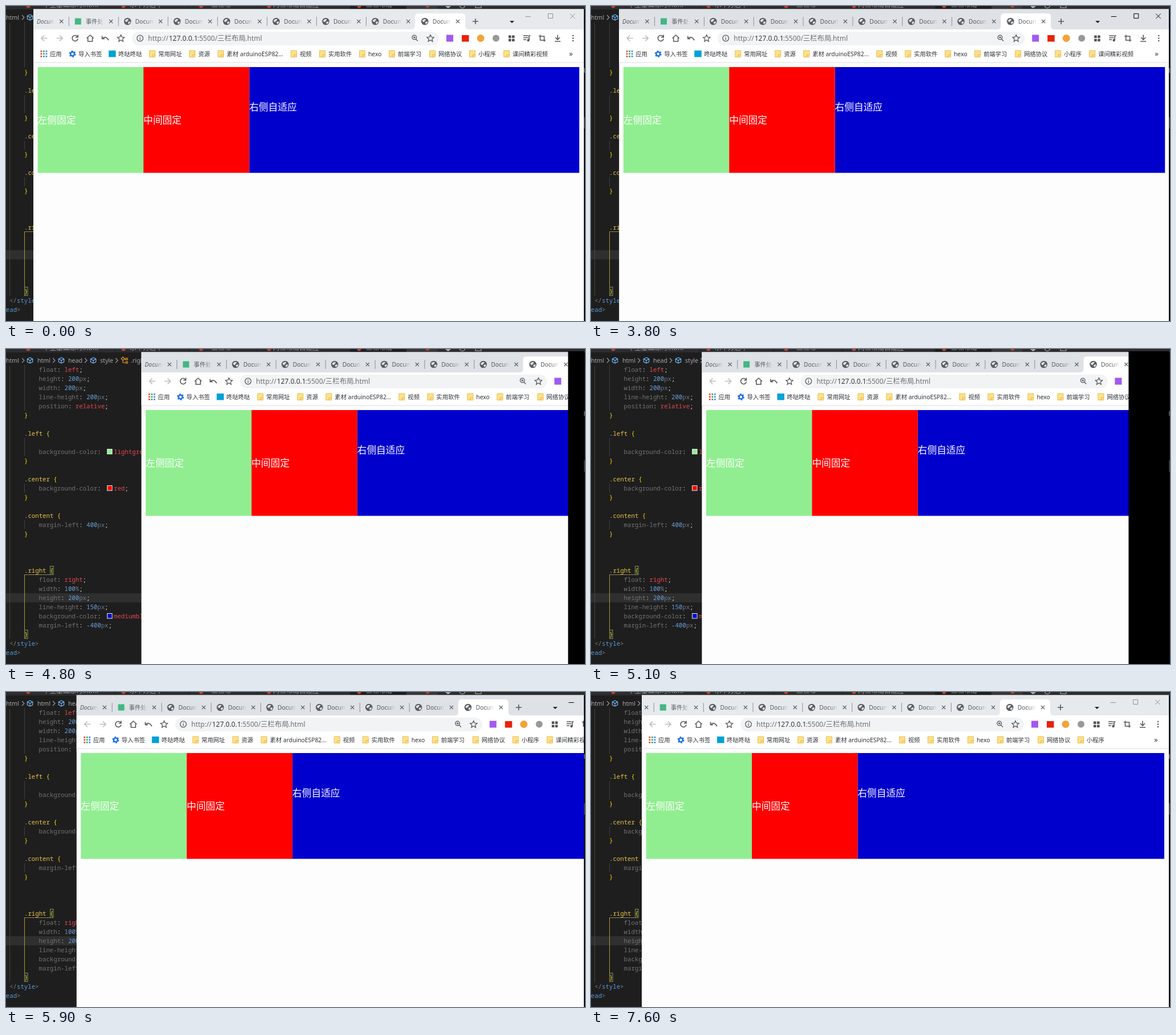
These frames come from a looping animation (1015 px wide and 552 px high, 7700 ms). An HTML page:

```html
<!DOCTYPE html>
<html lang="zh">
<head>
<meta charset="utf-8">
<title>三栏布局</title>
<style>
html, body { margin: 0; width: 100%; height: 100%; overflow: hidden; background: #1e1e1e; }
svg { display: block; }
text { font-family: "Noto Sans", "Noto Sans CJK SC", sans-serif; }
.code { font-family: "Noto Sans Mono", "DejaVu Sans Mono", monospace; font-size: 10.7px; }
.cjk { font-family: "Noto Sans CJK SC", sans-serif; }
.icon { fill: none; stroke: #55595e; stroke-width: 1.6; }
</style>
</head>
<body>
<svg id="stage" width="1015" height="552" viewBox="0 0 1015 552"></svg>
<script>
const LOOP = 7700, LEFT = 48, RIGHT = 1013, PEAK = 265;

const rect = (x, y, w, h, fill, more = '') =>
  `<rect x="${x}" y="${y}" width="${w}" height="${h}" fill="${fill}" ${more}/>`;
const circle = (x, y, r, fill, more = '') =>
  `<circle cx="${x}" cy="${y}" r="${r}" fill="${fill}" ${more}/>`;
const path = (d, more = '') => `<path d="${d}" ${more}/>`;
const text = (x, y, s, size, fill, more = '') =>
  `<text x="${x}" y="${y}" font-size="${size}" fill="${fill}" ${more}>${s}</text>`;
const at = (x, y, body, more = '') => `<g transform="translate(${x} ${y})" ${more}>${body}</g>`;
const icon = (x, y, d, more = '') => at(x, y, path(d, `class="icon" ${more}`));
const span = (s, fill) => `<tspan fill="${fill}">${s}</tspan>`;

// ---- code editor ----
const GOLD = '#e8c34a';

function codeLine(x, y, body) {
  return `<text class="code" x="${x}" y="${y + 3.8}">${body}</text>`;
}

function selector(y, name) {
  return codeLine(32, y, span(name, GOLD) + ' ' + span('{', '#ffd700'));
}

function declaration(y, prop, value, swatch) {
  const head = span(prop, '#727272') + span(':', '#d4d4d4');
  const end = span(';', '#d4d4d4');
  const number = value.match(/^(-?\d+)(.*)$/);
  const body = number ? span(number[1], '#6a9fd8') + span(number[2], '#68788a') : span(value, '#e5484d');
  if (!swatch) return codeLine(57.6, y, head + ' ' + body + end);
  return codeLine(57.6, y, head) +
    rect(177.5, y - 4.5, 8.5, 8.5, swatch, 'stroke="#eee" stroke-width="1"') +
    codeLine(189, y, body + end);
}

function breadcrumb() {
  const cube = x => icon(x, 20, 'M0 -5L4.7 -2.6V2.6L0 5L-4.7 2.6V-2.6ZM-4.7 -2.6L0 0L4.7 -2.6M0 0V5',
    'style="stroke:#75beff;stroke-width:1.1"');
  const word = (x, s) => text(x, 23.8, s, 10.6, '#a9a9a9');
  const arrow = x => icon(x, 20, 'M-2 -4L2 0L-2 4', 'style="stroke:#a0a0a0;stroke-width:1.1"');
  return word(0, 'html') + word(55, 'html') + word(109, 'head') + word(165, 'style') + word(219, '.right') +
    [30, 84, 140, 194].map(arrow).join('') + [42, 97, 153].map(cube).join('') +
    icon(207, 20, 'M-5 -3L-2 -6L1 -3L-2 0ZM-2 0V4H2M0 -2H3M3 -4H6V-1H3ZM3 2H6V5H3Z',
      'style="stroke:#ee9d28;stroke-width:1.2"');
}

function editorTabs() {
  const names = [[39, 65, '中型基础练习.html'], [206, 217, '水平方居中'], [342, 360, '三栏布'],
    [461, 468, '两栏布局自适应'], [619, 631, '三栏布局']];
  return rect(0, 0, 1015, 6, '#2d2d2d') + rect(604, 0, 98, 6, '#1e1e1e') + rect(702, 0, 54, 6, '#383838') +
    [190, 320, 440, 603].map(x => rect(x, 0, 1, 6, '#202020')).join('') +
    names.map(([dot, x, s]) => circle(dot, 0, 3.4, '#c8412b') + text(x, 1.5, s, 11.5, '#a0a0a0')).join('') +
    circle(739, 0, 3, '#c8412b') +
    icon(775, 0, 'M-4 0L0 3L4 0M0 3V-3', 'style="stroke:#bbb"') +
    circle(800, -1, 4.5, 'none', 'stroke="#bbb" stroke-width="1.2"') +
    rect(823, -5, 10, 8, 'none', 'stroke="#bbb"');
}

function editor() {
  const braces = [116, 196, 260, 324, 500].map(y => codeLine(32, y, span('}', '#ffd700'))).join('');
  const guides = [[28, 80], [156, 32], [236, 16], [300, 16]]
    .map(([y, h]) => rect(32, y, 1, h, '#404040')).join('');
  const box = (x, y) => rect(x, y, 5.5, 15, '#1d2a1d', 'stroke="#8a8a6a" stroke-width="1"');
  return rect(0, 0, 1015, 552, '#1e1e1e') + editorTabs() + breadcrumb() +
    rect(0, 428, 1013, 16, '#2f2f30') +
    rect(6, 30, 1, 478, '#45453c') + guides +
    rect(32, 396, 1, 96, '#b3942c') + rect(32, 395, 51, 1, '#8f8650') +
    box(77.5, 380.5) + box(32.5, 492.5) +
    declaration(36, 'float', 'left') + declaration(52, 'height', '200px') +
    declaration(68, 'width', '200px') + declaration(84, 'line-height', '200px') +
    declaration(100, 'position', 'relative') +
    selector(148, '.left') + declaration(180, 'background-color', 'lightgreen', '#90ee90') +
    selector(228, '.center') + declaration(244, 'background-color', 'red', '#f00') +
    selector(292, '.content') + declaration(308, 'margin-left', '400px') +
    selector(388, '.right') + declaration(404, 'float', 'right') + declaration(420, 'width', '100%') +
    declaration(436, 'height', '200px') + declaration(452, 'line-height', '150px') +
    declaration(468, 'background-color', 'mediumblue', '#0000cd') + declaration(484, 'margin-left', '-400px') +
    braces +
    codeLine(6.2, 516, span('&lt;/', '#808080') + span('style', '#569cd6') + span('&gt;', '#808080')) +
    codeLine(-19.4, 532, span('&lt;/', '#808080') + span('head', '#569cd6') + span('&gt;', '#808080')) +
    rect(RIGHT, 6, 2, 546, '#0c0c0c') + rect(RIGHT, 109, 2, 8, '#555') + rect(RIGHT, 195, 2, 20, '#3a3a3a');
}

// ---- browser ----
const cross = (x, y, r, more) => icon(x, y, `M${-r} ${-r}L${r} ${r}M${r} ${-r}L${-r} ${r}`, more);
const STAR = 'M0 -6L1.8 -2L6.1 -1.6L2.9 1.3L3.8 5.6L0 3.3L-3.8 5.6L-2.9 1.3L-6.1 -1.6L-1.8 -2Z';

const globe = circle(0, 0, 6.3, '#5a5e63') +
  path('M-4.5 -1.5Q-2 -5 1.5 -4Q2 -1.5 -0.5 -1Q0 1 -2 1Q-4 1 -4.5 -1.5ZM0.5 1.5Q3 -0.5 5 0.5Q4.5 4 1.5 4.8Q1.5 3 0.5 1.5Z',
    'fill="#e4e6e9"');

function tab(i) {
  const x = 39.4 + i * 86.85;
  const title = i === 1 ? '事件处理' : 'Document';
  const slant = i === 0 ? 'font-style="italic"' : '';
  const mark = i === 1 ? rect(-5.5, -5.5, 11, 11, '#41b883') : i ? globe : '';
  return at(x, 27, mark + text(i ? 13.5 : 14.5, 4, title, 10.3, 'url(#fade)', slant) +
    cross(57.8, 0, 3.1, 'style="stroke-width:1.3"') +
    (i < 7 ? rect(70.4, -8, 1, 16, '#8b8f95') : ''));
}

function tabs() {
  const all = Array.from({ length: 9 }, (_, i) => tab(i)).join('');
  return path('M711 41Q717 41 717 35V19Q717 13 723 13H799Q805 13 805 19V35Q805 41 811 41Z', 'fill="#fff"') + all +
    icon(823, 27, 'M-5 0H5M0 -5V5') + path('M883 26H891L887 30Z', 'fill="#222"') +
    `<g id="controls" fill="none" stroke-width="1">` +
    path('M910.5 18.5H920M950.5 13.5H958.5V21.5H950.5ZM989 13.5L997.5 22M997.5 13.5L989 22') + '</g>';
}

function toolbarLeft() {
  const dim = 'style="stroke:#b9bcc0"';
  return icon(67, 56.5, 'M5.5 0H-5M0 -5L-5 0L0 5', dim) + icon(94, 56.5, 'M-5.5 0H5M0 -5L5 0L0 5', dim) +
    icon(121, 56.5, 'M4.3 -2.8A5 5 0 1 0 5 1M5 -6V-1.8H.8') +
    icon(147.5, 56.5, 'M-6 0L0 -5.5L6 0M-4 -1V5.5H4V-1') +
    icon(174, 56.5, 'M-5.5 -4V1H-1M-5 .5Q1 -5 6 3.5') +
    icon(201.5, 56.5, STAR, 'style="stroke-width:1.3"') +
    icon(235, 56.5, 'M-5.3 0A5.3 5.3 0 1 0 5.3 0A5.3 5.3 0 1 0 -5.3 0M0 -.8V3M0 -3V-1.8', 'style="stroke-width:1.3"') +
    text(249, 60.6, 'http://', 12, '#6b6f74') + text(285.5, 60.6, '127.0.0.1', 12, '#35383c') +
    text(335.5, 60.6, ':5500/', 12, '#6b6f74') +
    text(370.5, 60.8, '三栏布局', 12.4, '#6b6f74', 'class="cjk"') + text(419.5, 60.6, '.html', 12, '#6b6f74');
}

function toolbarRight() {
  return icon(716.5, 56, 'M-4.5 -1A3.8 3.8 0 1 0 3.1 -1A3.8 3.8 0 1 0 -4.5 -1M2 2L5.5 5.5M-2.5 -1H1.2M-.7 -2.8V.8',
      'style="stroke-width:1.3"') +
    icon(744, 56.5, STAR, 'style="stroke-width:1.3"') +
    rect(772, 50.5, 12, 12, '#a259f0') +
    rect(799, 51, 12.5, 11.5, '#e8220c') +
    circle(832, 56.5, 6.5, '#f2a33a') +
    circle(859, 56.5, 6, '#999') +
    [[881, 51.5], [887, 51.5], [881, 57.5], [887, 57.5]].map(([x, y]) => rect(x, y, 4.5, 4.5, '#4d5156')).join('') +
    icon(913, 56.5, 'M-6 -4.5H2.5M-6 -1H2.5M-6 2.5H-1M4 3.5V-4.5H6.5') + circle(915.5, 60, 2.2, '#55595e') +
    icon(940, 56.5, 'M-6 -3.5H3.5V6M-3.5 -6V3.5H6') +
    icon(967, 56.5, 'M0 -6V2M-4 -1.5L0 2.5L4 -1.5M-5 5.5H5') +
    [52, 56.5, 61].map(y => circle(994, y, 1.3, '#55595e')).join('') +
    text(987, 87.5, '»', 13, '#333');
}

function bookmarks() {
  const label = (x, s) => text(x, 87.6, s, 10.3, '#2f3236');
  const folder = x => path(`M${x - 4.5} 78H${x + 5.5}V89.5H${x - 4.5}Z`, 'fill="#ffe08a" stroke="#e8c052"') +
    path(`M${x + 1} 89.5V85.5H${x + 5.5}`, 'fill="none" stroke="#e0b64a"');
  const items = [[267, '常用网址'], [337, '资源'], [387, '素材 arduinoESP82...'], [515, '视频'], [565, '实用软件'],
    [635, 'hexo'], [687, '前端学习'], [758, '网络协议'], [828, '小程序']];
  const hues = ['#ea4335', '#34a853', '#4285f4', '#fbbc05'];
  let dots = '';
  for (let i = 0; i < 9; i++)
    dots += rect(60.5 + i % 3 * 4.5, 78 + Math.floor(i / 3) * 4.5, 2.7, 2.7, hues[(i + Math.floor(i / 3)) % 4]);
  return dots + label(77, '应用') +
    circle(116.5, 84, 3.4, 'none', 'stroke="#1a6fe0" stroke-width="2.4"') +
    circle(116.5, 84, 5, 'none', 'stroke="#1a6fe0" stroke-width="2" stroke-dasharray="2.6 2.636"') +
    label(127, '导入书签') +
    rect(180, 78, 12.5, 11.5, '#00a1d6') + label(197, '咚哒咚哒') +
    items.map(([x, s]) => folder(x - 11) + label(x, s)).join('') +
    `<g id="extra">${folder(877) + label(888, '课间精彩视频')}</g>`;
}

function page() {
  const label = (x, y, s) => text(x, y, s, 16.7, '#fff', 'class="cjk"');
  return rect(55.6, 107, 185.4, 185.4, '#90ee90') + rect(241, 107, 185.4, 185.4, '#f00') +
    label(55.6, 206.3, '左侧固定') + label(241, 206.3, '中间固定') + label(426.4, 183, '右侧自适应');
}

document.getElementById('stage').innerHTML = `
<defs>
  <clipPath id="frame"><rect id="frameBox" y="5.5" height="547"/></clipPath>
  <linearGradient id="fade" gradientUnits="userSpaceOnUse" x1="32" y1="0" x2="46" y2="0">
    <stop offset="0" stop-color="#55595e"/><stop offset="1" stop-color="#55595e" stop-opacity="0"/>
  </linearGradient>
</defs>
${editor()}
<g clip-path="url(#frame)">
  <rect width="1015" height="552" fill="#fdfdfd"/>
  <rect id="strip" y="5" width="1015" height="36"/>
  <g class="right">${tabs()}</g>
  <rect y="41" width="1015" height="58" fill="#fff"/>
  <rect y="98.5" width="1015" height="1" fill="#dcdee1"/>
  <rect id="pill" y="45" height="24" rx="12" fill="#f1f3f4"/>
  <rect id="blue" y="107" height="185.4" fill="#0000cd"/>
  <g class="left">${toolbarLeft() + bookmarks() + page()}</g>
  <g class="right">${toolbarRight()}</g>
</g>
<rect id="gap" y="4" height="548" fill="#000"/>`;

const $ = id => document.getElementById(id);

// turning points of the drag: time, left edge of the window
const DRAG = [[3760, 48], [4600, PEAK], [5070, 193], [5500, 309.4], [6066, 78], [6400, 76]];

function leftEdge(t) {
  if (t >= 7600) return 89;
  if (t <= DRAG[0][0]) return LEFT;
  for (let i = 1; i < DRAG.length; i++) {
    const [t0, a] = DRAG[i - 1], [t1, b] = DRAG[i];
    if (t < t1) return a + (b - a) * (1 - Math.cos(Math.PI * (t - t0) / (t1 - t0))) / 2;
  }
  return 76;
}

function setSpan(id, x0, x1) {
  $(id).setAttribute('x', x0);
  $(id).setAttribute('width', Math.max(0, x1 - x0));
}

function shift(name, dx) {
  document.querySelectorAll(name).forEach(g => g.setAttribute('transform', `translate(${dx} 0)`));
}

function render(ms) {
  const t = Math.floor(ms / 100) * 100;
  const resized = t >= 7600;
  const active = t >= 1900 && !resized;
  const left = leftEdge(t);
  const dl = left - LEFT, dr = resized ? 0 : dl;
  const edge = t >= 5400 && t < 5700 ? 1015 : RIGHT;
  // the part that was off screen stays black while the window comes back
  const lag = t >= 4600 && t < 5400 ? Math.max(0, PEAK - left) : 0;

  setSpan('frameBox', left, Math.min(edge, RIGHT + dr));
  setSpan('pill', 221 + dl, 759 + dr);
  setSpan('blue', 426.4 + dl, 1005 + dr);
  setSpan('gap', RIGHT - lag, RIGHT);
  shift('.left', dl);
  shift('.right', dr);
  $('strip').setAttribute('fill', active ? '#dee1e6' : '#e7eaed');
  $('controls').setAttribute('stroke', active ? '#000' : '#8f9194');
  $('extra').setAttribute('visibility', resized ? 'hidden' : 'visible');
}

function tick() {
  render(performance.now() % LOOP);
  requestAnimationFrame(tick);
}
tick();
</script>
</body>
</html>
```
